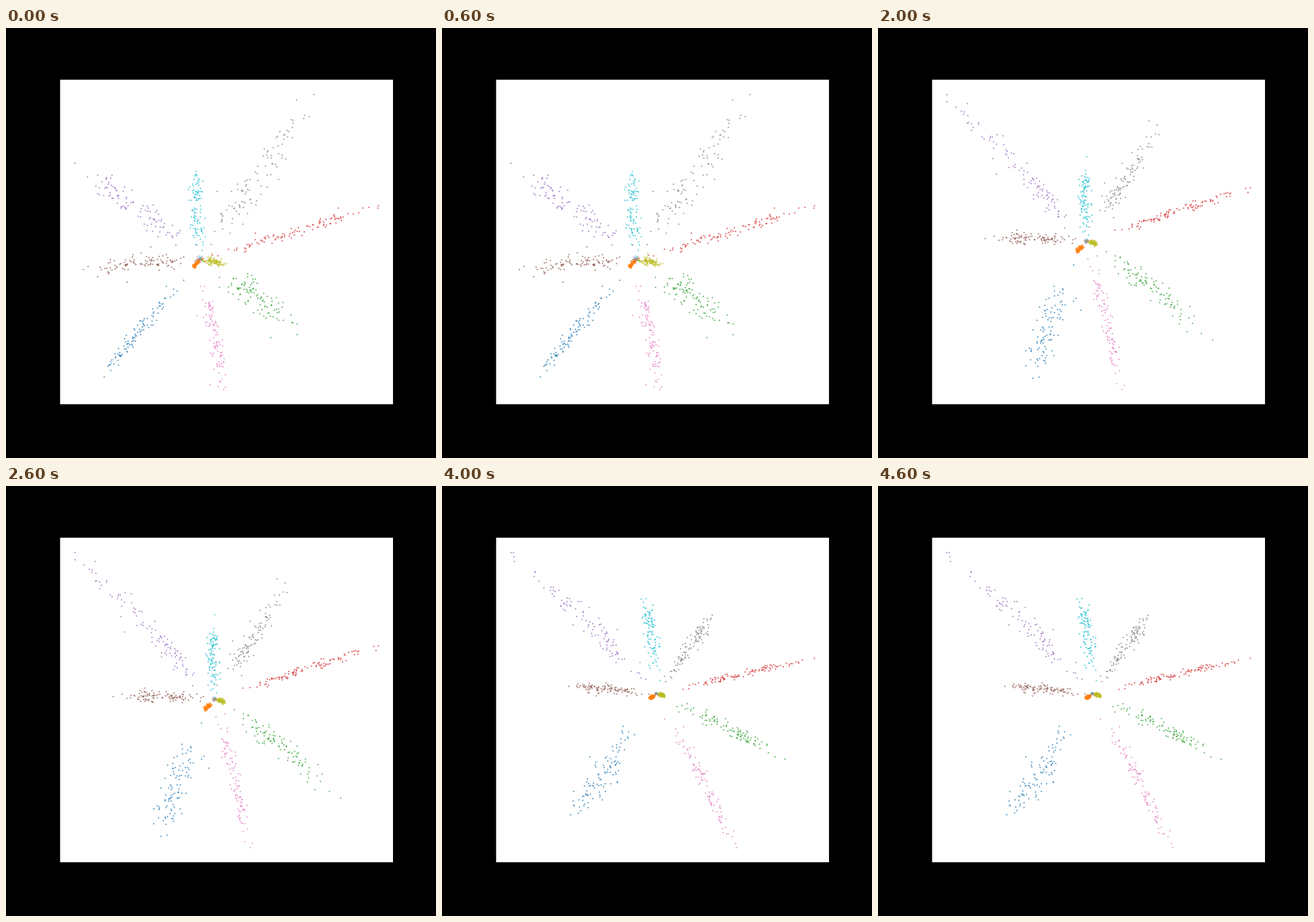
Recreate the animation shown at these times as a matplotlib script. Size 720 px wide and 720 px high, loop 5000 ms.

```python
import numpy as np
import matplotlib.pyplot as plt
from matplotlib.animation import FuncAnimation
from matplotlib.patches import Rectangle

SIZE = 720
COUNT = 100
COLORS = [f"C{i}" for i in range(10)]
LOW, HIGH = (115, 111), (623, 605)

rng = np.random.default_rng(7)
epochs = []


def cloud(hub, mx, my, tx, ty, near, width):
    """Scatter points from near the hub, through the dense middle, to the tip."""
    hub, mid, tip = np.array(hub), np.array((mx, my)), np.array((tx, ty))
    z = np.sort(rng.standard_normal(COUNT))
    z = np.where(z > 0, z / z[-1], -z / z[0])
    z = (np.sign(z) * np.abs(z) ** 0.8)[:, None]
    inner = (1 - near) * (mid - hub)
    points = mid + np.where(z > 0, z * (tip - mid), z * inner)

    ray = mid - hub
    normal = np.array((-ray[1], ray[0])) / np.hypot(*ray)
    jitter = width * np.clip(rng.standard_normal(COUNT), -2.2, 2.2)
    jitter[rng.random(COUNT) < 0.03] *= 2
    jitter[-1] = 0
    points += jitter[:, None] * normal
    return np.clip(points, LOW, HIGH)


def add_epoch(hub, radius, **rays):
    """Each ray: middle x, y, tip x, y, inner end (share of middle), width."""
    clouds = [cloud(hub, *ray) for ray in rays.values()]
    spokes = []
    for mx, my, *_ in rays.values():
        ray = np.array((mx - hub[0], my - hub[1]))
        end = hub + radius * ray / np.hypot(*ray)
        spokes.append(np.array((hub, end)))
    epochs.append((clouds, spokes))


add_epoch(
    (325, 387), 6,
    blue=(208, 521, 164, 584, 0.25, 6),
    orange=(316, 396, 313, 400, 0.1, 1.5),
    green=(415, 445, 487, 513, 0.4, 11),
    red=(470, 346, 623, 297, 0.1, 4),
    purple=(222, 302, 115, 226, 0.15, 9),
    brown=(235, 390, 129, 404, 0.1, 7),
    pink=(349, 512, 364, 605, 0.35, 6),
    gray=(412, 262, 515, 111, 0.2, 11),
    olive=(348, 391, 369, 394, 0.1, 3),
    cyan=(318, 290, 318, 240, 0.15, 6),
)
add_epoch(
    (359, 307), 5,
    blue=(220, 478, 165, 556, 0.25, 11),
    orange=(351, 316, 347, 319, 0.4, 2),
    green=(510, 397, 623, 488, 0.4, 15),
    red=(535, 257, 614, 232, 0.25, 3.5),
    purple=(232, 205, 115, 111, 0.35, 6),
    brown=(240, 309, 152, 318, 0.2, 5),
    pink=(397, 455, 435, 605, 0.3, 6),
    gray=(411, 222, 447, 158, 0.2, 8),
    olive=(376, 310, 403, 319, 0.2, 2.5),
    cyan=(346, 215, 331, 133, 0.2, 7),
)
add_epoch(
    (349, 357), 4,
    blue=(285, 493, 259, 586, 0.3, 11),
    orange=(336, 370, 332, 375, 0.5, 2),
    green=(450, 427, 560, 522, 0.3, 8),
    red=(510, 303, 623, 267, 0.3, 3.5),
    purple=(235, 232, 115, 111, 0.25, 8),
    brown=(255, 351, 179, 352, 0.2, 5),
    pink=(383, 490, 408, 605, 0.2, 5),
    gray=(407, 262, 467, 162, 0.2, 8),
    olive=(359, 359, 367, 363, 0.4, 2),
    cyan=(345, 283, 349, 215, 0.15, 5),
)
add_epoch(
    (343, 322), 6,
    blue=(266, 490, 237, 562, 0.2, 8),
    orange=(326, 336, 318, 342, 0.1, 2),
    green=(480, 393, 623, 450, 0.2, 10),
    red=(455, 291, 557, 268, 0.25, 4),
    purple=(202, 190, 115, 112, 0.15, 6),
    brown=(265, 307, 190, 292, 0.1, 4),
    pink=(392, 475, 430, 605, 0.2, 6),
    gray=(412, 224, 463, 146, 0.2, 9),
    olive=(355, 324, 363, 328, 0.2, 2),
    cyan=(335, 228, 325, 178, 0.15, 5),
)
add_epoch(
    (359, 348), 3,
    blue=(268, 490, 215, 550, 0.45, 11),
    orange=(351, 353, 347, 356, 0.4, 1.5),
    green=(480, 403, 574, 457, 0.3, 6),
    red=(505, 314, 623, 288, 0.3, 3),
    purple=(253, 236, 115, 111, 0.2, 9),
    brown=(275, 339, 212, 335, 0.15, 4),
    pink=(440, 500, 493, 605, 0.25, 6),
    gray=(420, 262, 452, 216, 0.25, 6),
    olive=(367, 349, 373, 352, 0.3, 1.5),
    cyan=(349, 238, 341, 188, 0.2, 6),
)

fig = plt.figure(figsize=(SIZE / 100, SIZE / 100), dpi=100, facecolor="black")
ax = fig.add_axes((0, 0, 1, 1))
ax.set(xlim=(0, SIZE), ylim=(SIZE, 0))
ax.axis("off")
ax.add_patch(Rectangle((90.6, 86.6), 557.4, 543.4, fc="white", lw=0, snap=False))

dots = [ax.plot([], [], ".", ms=1, color=c)[0] for c in COLORS]
lines = [ax.plot([], [], color=c, lw=0.8)[0] for c in COLORS]


def update(i):
    clouds, spokes = epochs[i]
    for artist, xy in zip(dots + lines, clouds + spokes):
        artist.set_data(*xy.T)
    return dots + lines


anim = FuncAnimation(fig, update, frames=len(epochs), interval=1000,
                     repeat=True, repeat_delay=0)
plt.show()
```
